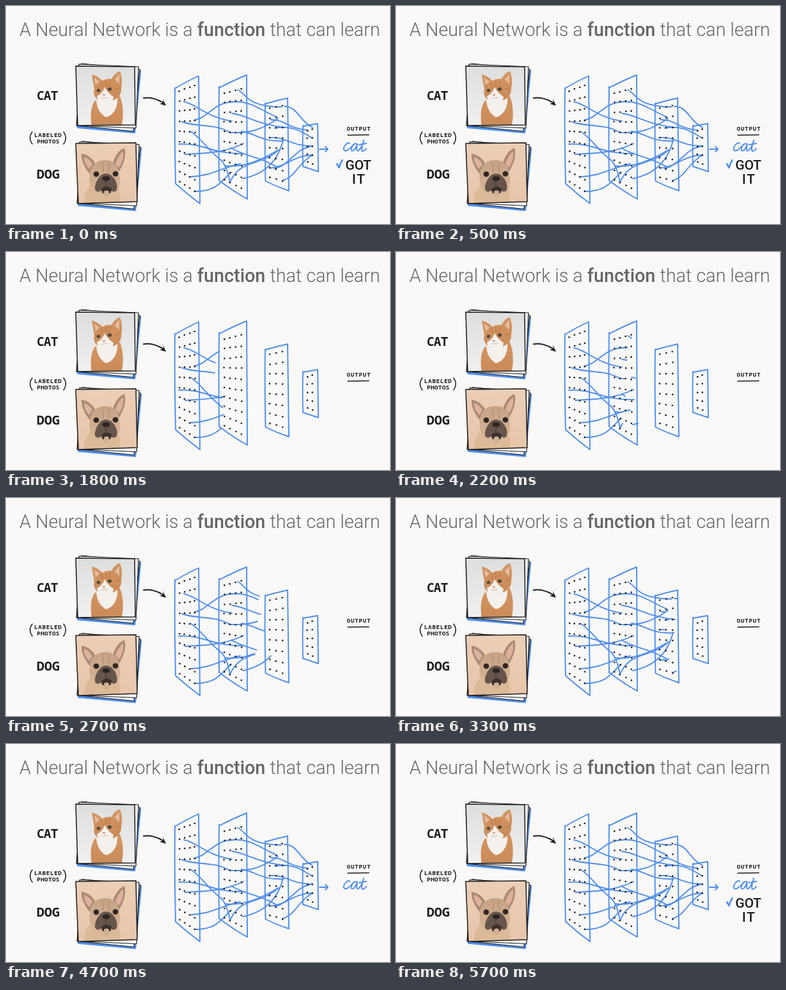
An HTML page for the animation above (5.8 s loop, 600 by 341 pixels).

```html
<!DOCTYPE html>
<html lang="en">
<head>
<meta charset="utf-8">
<title>Neural network sketch</title>
<style>
  html, body { margin: 0; width: 100%; height: 100%; overflow: hidden; background: #faf9f8; }
  svg { display: block; width: 100vw; height: 100vh; }
  text { fill: #1b1b1b; }
  .title { font-family: Roboto, Arial, sans-serif; font-weight: 300; fill: #666; }
  .title tspan { font-weight: 500; }
  .label { font-family: "Noto Sans Mono", "DejaVu Sans Mono", monospace; font-weight: 700; text-anchor: middle; }
  .note { font-family: Roboto, Lato, sans-serif; font-weight: 500; font-size: 21px; text-anchor: middle; }
  .blue, .black { fill: none; stroke-linecap: round; stroke-linejoin: round; }
  .blue { stroke: #4f8eea; stroke-width: 1.9; }
  .black { stroke: #1b1b1b; stroke-width: 1.5; }
</style>
</head>
<body>
<svg viewBox="0 0 600 341">
  <defs>
    <linearGradient id="grey" x2="0" y2="1">
      <stop stop-color="#dcdddd"/><stop offset="1" stop-color="#f1f1f0"/>
    </linearGradient>
    <linearGradient id="peach" x2="0" y2="1">
      <stop stop-color="#ebcfb7"/><stop offset="1" stop-color="#e8c5a9"/>
    </linearGradient>
    <linearGradient id="ginger" x2="0" y2="1">
      <stop stop-color="#d39561"/><stop offset="1" stop-color="#c98a58"/>
    </linearGradient>
    <linearGradient id="fawn" x2="0" y2="1">
      <stop stop-color="#c6a284"/><stop offset="1" stop-color="#d9b898"/>
    </linearGradient>
    <g id="stack" stroke-linejoin="round">
      <path d="M119 93L210 101 201 198 112 190Z" fill="#4f8eea" stroke="#4f8eea" stroke-width="2.4"/>
      <path d="M118 90L209 99 199 196 110 187Z" fill="#faf9f8" stroke="#1b1b1b" stroke-width="1.2"/>
      <path d="M114 91L207 95 203 191 111 187Z" fill="#faf9f8" stroke="#1b1b1b" stroke-width="1.2"/>
    </g>
    <clipPath id="catClip"><path d="M109 94L201 95 202 186 112 187Z"/></clipPath>
    <clipPath id="dogClip"><path d="M109 215L203 214 205 306 113 309Z"/></clipPath>
  </defs>

  <text class="title" id="title" x="21" y="47" font-size="28.4">A Neural Network is a <tspan>function</tspan> that can learn</text>

  <text class="label" x="64.5" y="147" font-size="19" letter-spacing="-.6">CAT</text>
  <text class="label" x="66" y="270" font-size="20">DOG</text>
  <text class="label" x="65.8" y="205" font-size="9.4" letter-spacing=".6">LABELED</text>
  <text class="label" x="66" y="215" font-size="9.4" letter-spacing=".3">PHOTOS</text>
  <path class="black" d="M41 197Q34 206 41 216M90 197Q97 206 90 216"/>

  <use href="#stack"/>
  <g clip-path="url(#catClip)">
    <rect x="105" y="90" width="100" height="100" fill="url(#grey)"/>
    <path d="M139 148C131 160 132 174 134 190H180C184 174 184 156 178 141Z" fill="url(#ginger)"/>
    <path d="M141 144C141 158 146 168 156 174C168 171 175 159 174 143Z" fill="#f4f0ec"/>
    <path d="M138 130L134 107Q145 110 150 117Q158 113 165 114Q170 104 178 102Q183 114 180 130C181 142 168 150 156 150C143 150 135 142 138 130Z" fill="url(#ginger)"/>
    <path d="M138 112L146 118 140 124ZM170 115L177 106 177 122Z" fill="#e6bda1"/>
    <path d="M149 118L151 127M156 116L156 126M163 117L160 126M171 130L178 128" stroke="#bd7b49" stroke-width="1.4"/>
    <path d="M154 127Q151 137 142 141Q143 151 155 154Q168 152 168 142Q160 137 154 127Z" fill="#f4f0ec"/>
    <ellipse cx="144.5" cy="132" rx="2.8" ry="2.5" fill="#4d4a3d"/>
    <ellipse cx="162" cy="130" rx="3.1" ry="2.7" fill="#4d4a3d"/>
    <path d="M150.5 138H155.5L153 141Z" fill="#cf8d7e"/>
    <path d="M149 144Q152 145 153 143Q156 145 159 143" fill="none" stroke="#c9a796" stroke-width=".8"/>
  </g>
  <path class="black" d="M109 94L201 95 202 186 112 187Z"/>

  <use href="#stack" transform="translate(1 121.5)"/>
  <g clip-path="url(#dogClip)">
    <rect x="105" y="210" width="105" height="105" fill="url(#peach)"/>
    <path d="M132 280Q121 292 121 312H178Q180 294 174 280Z" fill="#dcba97"/>
    <path d="M131 263Q117 246 118 231Q132 233 140 247ZM167 245Q173 227 185 222Q190 238 176 260Z" fill="#a98a75"/>
    <path d="M130 255Q121 246 122 236Q131 239 135 247ZM171 246Q176 232 183 227Q185 241 176 253Z" fill="#dfb09e"/>
    <path d="M131 264C132 247 144 241 156 241C168 241 176 249 177 264C181 282 174 295 157 297C139 297 128 284 131 264Z" fill="url(#fawn)"/>
    <path d="M150 245Q154 252 151 260M162 245Q159 252 162 260" fill="none" stroke="#b18d70" stroke-width="1.3"/>
    <path d="M148 265Q156 259 165 265Q176 276 173 288Q167 294 163 286L157 283 150 287Q143 294 139 287Q138 276 148 265Z" fill="#66554c"/>
    <ellipse cx="141" cy="263" rx="4.4" ry="4.2" fill="#2f2825"/>
    <ellipse cx="171" cy="262.5" rx="4.4" ry="4.2" fill="#2f2825"/>
    <ellipse cx="156.5" cy="270" rx="6" ry="3.8" fill="#2b2523"/>
    <path d="M156 273V282M149 287Q157 279 165 286L163 292Q157 295 151 292Z" fill="#3a312d" stroke="#3a312d"/>
    <path d="M153 290Q157 287 161 290L160 299H154Z" fill="#cfb095"/>
  </g>
  <path class="black" d="M109 215L203 214 205 306 113 309Z"/>

  <path class="black" d="M215 144C225 142 237 146 245 151" style="stroke-width:2"/>
  <path d="M245 145L250 156 240 153 246 151Z" fill="#1b1b1b"/>

  <g id="panels"></g>
  <g id="lines"></g>
  <g id="dots" fill="#222"></g>

  <text class="label" x="551.3" y="194.8" font-size="9" letter-spacing=".9">OUTPUT</text>
  <path class="black" d="M534 202L567 201.4"/>
  <g id="verdict">
    <path class="blue" d="M517 247L520.5 253Q522 246 525.5 241" style="stroke-width:2.5"/>
    <text class="note" x="550.5" y="256">GOT</text>
    <text class="note" x="551.5" y="278" letter-spacing="1.5">IT</text>
  </g>
</svg>
<script>
const LOOP = 5800, STEP = 100, CLEAR = 600, VERDICT = 4800;
const $ = id => document.getElementById(id);

function add(parent, tag, attrs) {
  const el = document.createElementNS("http://www.w3.org/2000/svg", tag);
  for (const key in attrs) el.setAttribute(key, attrs[key]);
  parent.append(el);
  return el;
}

const title = $("title");
title.setAttribute("font-size", 28.4 * 563.5 / title.getComputedTextLength());

// Outline, then dot grid: columns, rows, x range, y of the four corner dots
const layers = [
  { d: "M264 129Q284 117 301 109.5L303 309Q284 295 265 278Q263 200 264 128", cols: 4, rows: 10, x: [271, 295], top: [133, 124], end: [275, 290] },
  { d: "M333 128Q356 116 376 108L377 302Q354 289 333 273Q332 200 333 126", cols: 4, rows: 10, x: [341, 368], top: [136, 130], end: [272, 285] },
  { d: "M405 153Q422 148 440 144L442 289Q424 283 405.5 274Q404 210 405 152", cols: 3, rows: 8, x: [412, 432], top: [160, 156], end: [268, 274] },
  { d: "M464 188L487 184 488 259 464 251Q463 218 464 187", cols: 2, rows: 5, x: [471, 479], top: [195, 193], end: [244, 247] }
];

let seed = 7;
const jitter = () => (seed = seed * 16807 % 2147483647) / 2147483647 - 0.5;
const mix = (a, b, k) => a + (b - a) * k;

for (const { d, cols, rows, x, top, end } of layers) {
  add($("panels"), "path", { d, class: "blue" });
  for (let r = 0; r < rows; r++) for (let c = 0; c < cols; c++) {
    const u = c / (cols - 1), v = r / (rows - 1);
    add($("dots"), "circle", {
      cx: mix(x[0], x[1], u) + jitter(),
      cy: mix(mix(top[0], top[1], u), mix(end[0], end[1], u), v) + jitter(),
      r: 1.35
    });
  }
}

// Each group of strokes is drawn between its start and end time
const groups = [
  { from: 1000, to: 2200, strokes: [
    "M278 150C298 153 312 174 353 180",
    "M295 178C314 176 326 150 355 150",
    "M275 181C297 190 326 183 350 198",
    "M288 196C305 206 318 229 336 241Q346 252 350 276",
    "M270 216C310 214 322 232 372 231",
    "M280 232C316 230 344 229 371 215",
    "M289 267C322 266 338 252 366 247",
    "M295 290C332 290 337 272 352 260"
  ] },
  { from: 2100, to: 3200, strokes: [
    "M362 131C376 137 374 157 430 158",
    "M355 150C382 148 396 162 424 174",
    "M353 168C375 170 390 185 436 190",
    "M350 198C380 199 397 195 425 176",
    "M368 196C388 198 397 213 434 211",
    "M352 222C372 235 393 234 424 252",
    "M342 250C372 254 404 238 424 226",
    "M350 276C366 238 397 252 426 225",
    "M370 270C400 264 424 246 433 210"
  ] },
  { from: 3200, to: 4200, strokes: [
    "M435 157C456 157 458 180 479 190",
    "M414 178C434 177 442 192 471 194",
    "M420 191C442 187 456 192 479 207",
    "M413 206C436 204 448 220 479 219",
    "M420 254C442 250 452 224 475 220",
    "M412 254C442 250 446 235 479 233",
    "M432 273C452 268 456 246 479 233"
  ] },
  { from: 4200, to: 4400, strokes: ["M490 224H503M499 220L503 224 499 228"] },
  { from: 4300, to: 4700, strokes: [
    "M537 215C534 211 526 221 528 225C530 229 537 224 541 219C543 214 550 215 549 217C545 211 538 222 540 226C543 229 548 220 549 216C547 224 548 228 551 226C555 222 558 215 559 210C555 222 555 228 558 227Q561 226 563 223M552 217L563 215"
  ] }
];

for (const group of groups) {
  group.paths = group.strokes.map(d =>
    add($("lines"), "path", { d, class: "blue", pathLength: 1, "stroke-dasharray": "1 2" }));
}

function draw(ms) {
  const t = Math.floor(ms % LOOP / STEP) * STEP;
  const full = t < CLEAR;
  for (const { from, to, paths } of groups) {
    const p = full ? 1 : Math.min(1, Math.max(0, (t - from) / (to - from)));
    for (const path of paths) {
      path.setAttribute("visibility", p ? "visible" : "hidden");
      path.setAttribute("stroke-dashoffset", 1 - p);
    }
  }
  $("verdict").setAttribute("visibility", full || t >= VERDICT ? "visible" : "hidden");
}

const start = performance.now();
function tick() {
  draw(performance.now() - start);
  requestAnimationFrame(tick);
}
tick();
</script>
</body>
</html>
```
